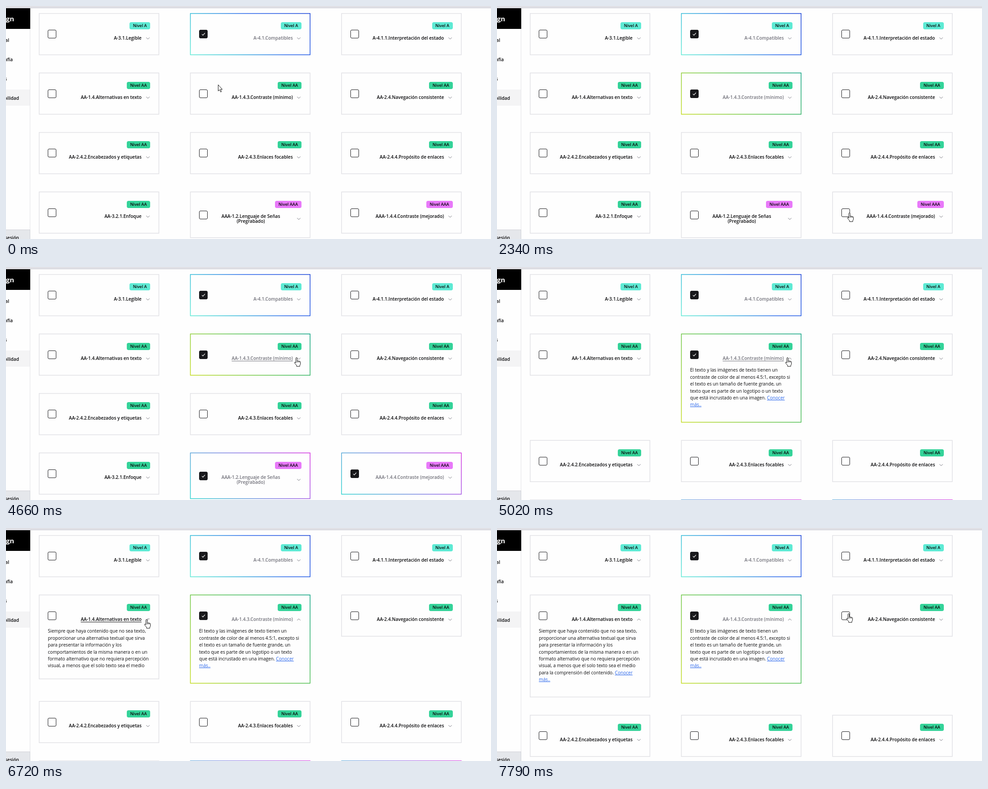
Recreate the animation shown at these times as an HTML page. Size 1080x519 px, loop 8000 ms.

```html
<!DOCTYPE html>
<html lang="es">
<head>
<meta charset="utf-8">
<title>Lista de accesibilidad</title>
<style>
  html, body { margin: 0; width: 100%; height: 100%; overflow: hidden; background: #fff; }
  #stage { position: relative; width: 1080px; height: 519px; overflow: hidden; background: #fefefe;
    font: 600 10.12px "Open Sans", "Noto Sans", sans-serif; color: #09090b; }
  #stage div, #stage svg { position: absolute; box-sizing: border-box; }
  svg { overflow: visible; fill: none; }
  .bar { inset: 0 0 auto; height: 5px; background: #e0e0e5; border-bottom: 1px solid #d0d0d6; }
  .side { left: 0; top: 5px; width: 54px; bottom: 0; box-shadow: inset -1px 0 #e4e4e7; overflow: hidden; }
  .side div { white-space: nowrap; line-height: 16px; }
  .side .logo { left: 0; top: 0; width: 54px; height: 46px; background: #000; }
  .side .active { left: 0; top: 181px; width: 53px; height: 36px; background: #f4f4f5; }
  .side .exit { left: -9px; top: 493px; width: 63px; height: 40px; background: #e5e7eb; border: 1px solid #cfd0d6; }
  .side .brand { color: #fff; font-size: 15px; font-weight: 700; }
  .card { width: 268.1px; }
  .box { left: 20.2px; width: 19px; height: 19px; border: 1px solid #18181b; border-radius: 3px; background: #fff; }
  .box svg { left: -1px; top: -1px; }
  .badge { right: 20px; top: 20.3px; height: 16px; border-radius: 4px; font-size: 9.2px; line-height: 16px; text-align: center; }
  .title { line-height: 11px; white-space: pre; text-align: center; text-underline-offset: 1.5px; }
  .body { left: 20.2px; top: 74.1px; overflow: hidden; white-space: pre; font-size: 10.12px; font-weight: 400; line-height: 15.35px; }
  .body u { color: #2563eb; }
</style>
</head>
<body>
<div id="stage"></div>
<script>
const LOOP = 8000;
const WIDTH = 268.1, HEIGHT = 93.5, TALL = 103.3, MID = HEIGHT / 2;
const LINE = 1.55, GREY = '#e2e2e6';
// badge colour, then border stops from bottom left to top right
const LEVELS = {
  A: ['#5eead4', [0, '#5eead4'], [.26, '#35bdd8'], [.6, '#2563eb'], [1, '#1d46d8']],
  AA: ['#34d399', [0, '#c4dc20'], [.58, '#4fbf55'], [1, '#0ea384']],
  AAA: ['#e879f9', [0, '#2dd4cf'], [.6, '#8f70e6'], [1, '#d635e0']]
};
// title, time of ticking
const CARDS = [
  ['A-3.1.Legible'], ['A-4.1.Compatibles', -1], ['A-4.1.1.Interpretación del estado'],
  ['AA-1.4.Alternativas en texto'], ['AA-1.4.3.Contraste (mínimo)', 905], ['AA-2.4.Navegación consistente'],
  ['AA-2.4.2.Encabezados y etiquetas'], ['AA-2.4.3.Enlaces focables'], ['AA-2.4.4.Propósito de enlaces'],
  ['AA-3.2.1.Enfoque'], ['AAA-1.2.Lenguaje de Señas\n(Pregrabado)', 3615], ['AAA-1.4.4.Contraste (mejorado)', 2555]
];
const MORE = ' <u>Conocer</u>\n<u>más..</u>';
const PANELS = {
  3: { start: 6621, extra: 135.3, html: `Siempre que haya contenido que no sea texto,
proporcionar una alternativa textual que sirva
para presentar la información y los
comportamientos de la misma manera o en un
formato alternativo que no requiera percepción
visual, a menos que el solo texto sea el medio
para la comprensión del contenido.` + MORE },
  4: { start: 4790, extra: 104.6, html: `El texto y las imágenes de texto tienen un
contraste de color de al menos 4.5:1, excepto si
el texto es un tamaño de fuente grande, un
texto que es parte de un logotipo o un texto
que está incrustado en una imagen.` + MORE }
};
// pointer hotspot: time, x, y
const PATH = [
  [0, 472, 175], [70, 472, 175], [420, 634, 253], [780, 433, 192], [950, 433, 190],
  [1200, 872, 346], [1600, 641, 440], [1760, 637, 436], [2250, 791, 462], [2430, 780, 461],
  [2640, 780, 461], [3200, 434, 466], [3700, 434, 466], [4370, 641, 205], [4510, 645, 193],
  [4640, 647, 202], [5570, 647, 202], [6050, 305, 206], [6240, 305, 206], [6300, 307, 205],
  [6460, 307, 205], [6580, 313, 204], [6880, 313, 204], [7240, 868, 203], [7540, 785, 196], [7760, 783, 191]
];

const stage = document.getElementById('stage');
function add(parent, cls, css = '', html = '') {
  const el = document.createElement('div');
  el.className = cls;
  el.style.cssText = css;
  el.innerHTML = html;
  return parent.appendChild(el);
}
function set(el, attrs) {
  for (const name in attrs) el.setAttribute(name, attrs[name]);
}

add(stage, 'bar');
const side = add(stage, 'side');
['logo', 'active', 'exit'].forEach(cls => add(side, cls));
[['Design', 18, 28, 'brand'], ['General', 7, 76], ['Tipografía', 15, 119], ['Colores', 2, 162],
  ['Accesibilidad', 29, 205], ['Cerrar sesión', 29, 516]].forEach(([text, right, y, cls = '']) =>
  add(side, cls, `right:${54 - right}px;top:${y - 13}px`, text));

const levelOf = text => text.split('-')[0];

// Borders share one SVG so that their edges can fall between pixels.
const edges = add(stage, '', 'left:0;top:0', '<svg width="1080" height="519">' + CARDS.map(([text], i) =>
  `<linearGradient id="g${i}" gradientUnits="userSpaceOnUse">${LEVELS[levelOf(text)].slice(1).map(([at, color]) =>
    `<stop offset="${at}" stop-color="${color}"/>`).join('')}</linearGradient>
  <rect width="${WIDTH - LINE}" stroke-width="${LINE}"/>`).join('') + '</svg>');
const rects = edges.querySelectorAll('rect');
const gradients = edges.querySelectorAll('linearGradient');

const cards = CARDS.map(([text, tick = Infinity], i) => {
  const row = i / 3 | 0, left = 73.1 + 336.7 * (i % 3);
  const lines = text.split('\n').length, tall = lines > 1;
  const height = tall ? TALL : HEIGHT;
  const level = levelOf(text);
  const titleY = MID + (tall ? 13.8 : 8.6);
  const el = add(stage, 'card', `left:${left}px`);
  const box = add(el, 'box', `top:${height / 2 - 9.5}px`,
    '<svg width="19" height="19"><path d="M6.3 9.8l2.3 2.3 4.4-5" stroke="#fff" stroke-width="1.2"/></svg>');
  add(el, 'badge', `width:${39.5 + 6.5 * level.length}px;background:${LEVELS[level][0]}`, 'Nivel ' + level);
  const title = add(el, 'title', `right:${tall ? 67.5 : 39.3}px;top:${titleY - 5.5 * lines}px`, text);
  const chevron = add(el, '', `left:242.5px;top:${titleY + .5}px`,
    '<svg width="1" height="1"><path d="M-3.6-1.8L0 1.8 3.6-1.8" stroke="#71717a"/></svg>').querySelector('path');
  const panel = PANELS[i];
  const body = panel && add(el, 'body', '', panel.html);
  return { row, left, tick, height, titleY, el, box, title, chevron, panel, body, edge: rects[i], gradient: gradients[i] };
});

const pointer = add(stage, '', 'left:0;top:0', `<svg width="16" height="22" fill="#fff" stroke="#111" stroke-linejoin="round">
  <path fill="#fff" d="M.5.5V14.3L3.6 11.5 5.9 16.6 7.9 15.7 5.7 10.7H9.7Z"/>
  <g fill="#fff" transform="translate(-5.5 -1)"><path d="M4 12.5V2.2a1.4 1.4 0 0 1 2.8 0V8.3q1.4-1 2.6.3 1.4-.8 2.5.5 2-.4 2.3 1.6V14q0 2.5-1.5 4v2.3H5.5V18L1 12.8q-.4-2 1.4-1.8Z"/>
  <path d="M6.8 8.3v3.2M9.4 8.6v2.9M11.9 9.1v2.4"/></g></svg>`);
const [arrow, hand] = pointer.firstChild.children;

function pointerAt(t) {
  const k = PATH.findIndex(p => p[0] > t);
  if (k < 0) return PATH[PATH.length - 1].slice(1);
  const [t0, x0, y0] = PATH[k - 1], [t1, x1, y1] = PATH[k];
  const u = (t - t0) / (t1 - t0), s = u * u * (3 - 2 * u);
  return [x0 + (x1 - x0) * s, y0 + (y1 - y0) * s];
}

function opened(panel, t) {
  if (!panel) return 0;
  const u = Math.min(1, Math.max(0, (t - panel.start) / 220));
  return 1 - (1 - u) ** 2;
}

function drawEdge(c, i, top, height, on) {
  const cx = c.left + WIDTH / 2, cy = top + height / 2, reach = (WIDTH + height) / 4;
  set(c.edge, { x: c.left + LINE / 2, y: top + LINE / 2, height: height - LINE, stroke: on ? `url(#g${i})` : GREY });
  set(c.gradient, { x1: cx - reach, y1: cy + reach, x2: cx + reach, y2: cy - reach });
}

function render(t) {
  const [px, py] = pointerAt(t);
  const shift = Math.max(...Object.values(PANELS).map(p => p.extra * opened(p, t)));
  let active = false;
  cards.forEach((c, i) => {
    const open = opened(c.panel, t), extra = c.panel ? c.panel.extra * open : 0;
    const top = 15.9 + 132.5 * c.row + (c.row > 1 ? shift : 0);
    const on = t >= c.tick;
    const x = px - c.left, y = py - top;
    const overTitle = x > c.title.offsetLeft - 2 && x < 250 && Math.abs(y - c.titleY) < 14;
    const overBox = x > 19 && x < 41 && Math.abs(y - c.height / 2) < 11;
    active = active || overTitle || overBox;
    drawEdge(c, i, top, c.height + extra, on);
    c.el.style.top = top + 'px';
    c.box.style.background = on ? '#18181b' : '#fff';
    c.title.style.color = on ? '#71717a' : '';
    c.title.style.textDecoration = overTitle ? 'underline' : '';
    c.chevron.setAttribute('transform', `rotate(${180 * open})`);
    if (c.body) c.body.style.height = extra + 'px';
  });
  arrow.style.display = active ? 'none' : '';
  hand.style.display = active ? '' : 'none';
  pointer.style.transform = `translate(${Math.round(px)}px, ${Math.round(py)}px)`;
}

function frame() {
  render(performance.now() % LOOP);
  requestAnimationFrame(frame);
}
frame();
</script>
</body>
</html>
```
